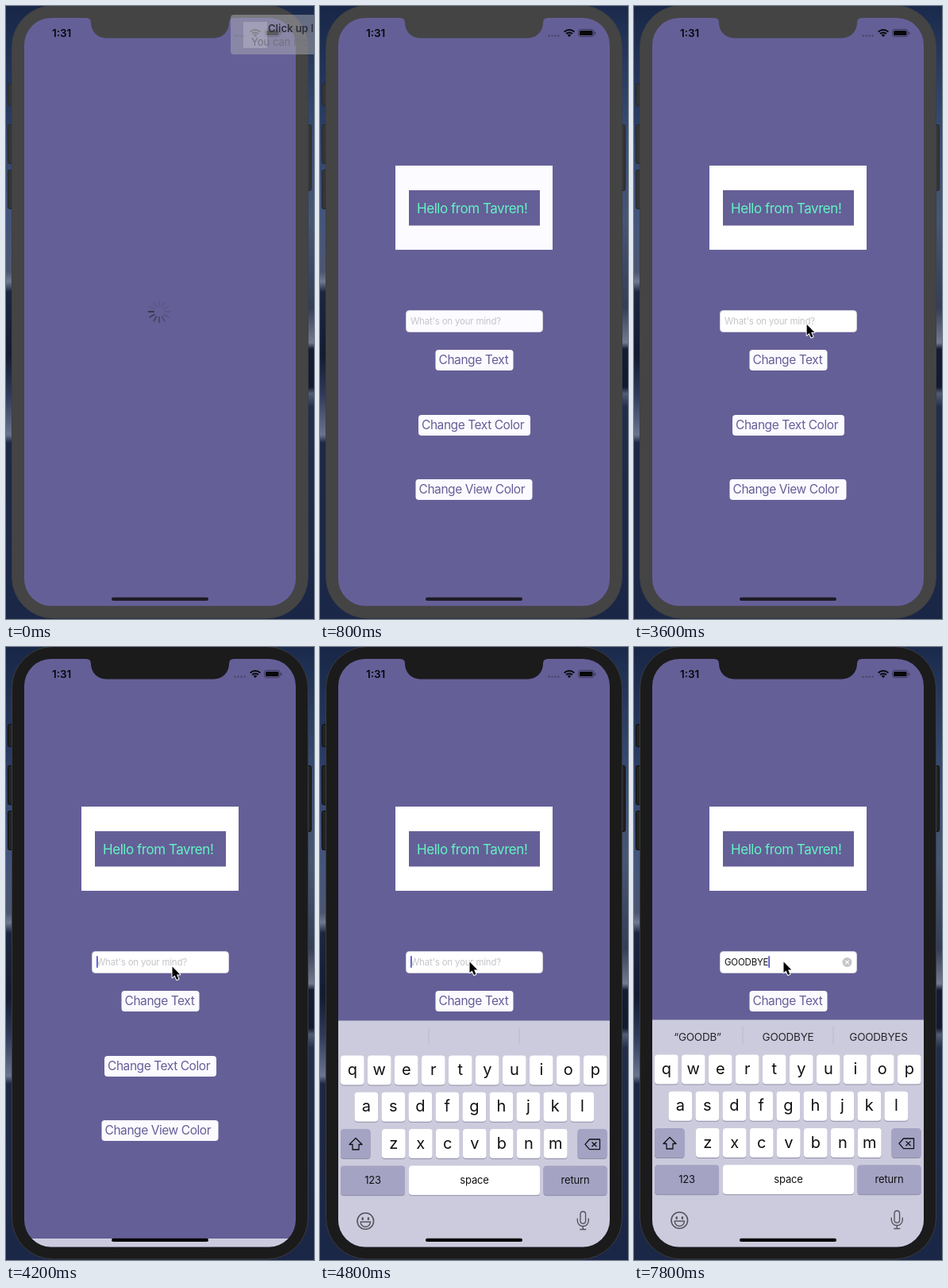
An HTML page with a canvas for the animation above (8000 ms loop, 388 by 772 pixels).

```html
<!DOCTYPE html>
<html lang="en">
<head>
<meta charset="utf-8">
<title>Phone text demo</title>
<style>
html, body { margin: 0; width: 388px; height: 772px; overflow: hidden; background: #1c2848; }
canvas { display: block; }
</style>
</head>
<body>
<canvas id="stage" width="388" height="772"></canvas>
<script>
const ctx = document.getElementById('stage').getContext('2d');
const LOOP = 8000, STEP = 200;
const PURPLE = '#655f98', KEY_DARK = '#a5a3c4', INK = '#111113';

// time, x, y of the pointer tip
const POINTER = [
  [1400, 396, 238], [2200, 296, 313], [2400, 296, 313], [3200, 220, 400],
  [3400, 220, 400], [4000, 209, 402], [4400, 209, 402], [4800, 188, 396]
];
// time, typed text, suggestions
const TYPING = [
  [6000, 'G', []],
  [6200, 'GO', ['“G”', 'Good', 'Great']],
  [6600, 'GOO', ['“GO”', 'Good', 'Great']],
  [6800, 'GOOD', ['“GOO”', 'GOOD', 'GOODS']],
  [7000, 'GOODB', ['“GOOD”', 'GOODBYE', 'GOODBYES']],
  [7200, 'GOODBY', ['“GOOD”', 'GOODBYE', 'GOODBYES']],
  [7600, 'GOODBYE', ['“GOODB”', 'GOODBYE', 'GOODBYES']]
];

function box(x, y, w, h, r, fill, line) {
  ctx.beginPath();
  ctx.roundRect(x, y, w, h, r);
  if (fill) { ctx.fillStyle = fill; ctx.fill(); }
  if (line) { ctx.strokeStyle = line; ctx.lineWidth = 1; ctx.stroke(); }
}

function text(str, x, y, size, color, { align = 'left', weight = 400, track = -0.018 } = {}) {
  ctx.font = `${weight} ${size}px Inter, "Open Sans", sans-serif`;
  ctx.letterSpacing = `${track * size}px`;
  ctx.textAlign = align;
  ctx.fillStyle = color;
  ctx.fillText(str, x, y);
}

function path(points, close) {
  ctx.beginPath();
  points.forEach(([x, y]) => ctx.lineTo(x, y));
  if (close) ctx.closePath();
}

function stroke(color, width) {
  ctx.strokeStyle = color;
  ctx.lineWidth = width;
  ctx.stroke();
}

function dot(x, y, r, color) {
  ctx.beginPath();
  ctx.arc(x, y, r, 0, 7);
  ctx.fillStyle = color;
  ctx.fill();
}

function strip(x, w, stops) {
  const g = ctx.createLinearGradient(0, 0, 0, 772);
  stops.forEach(([y, c]) => g.addColorStop(y / 772, c));
  ctx.fillStyle = g;
  ctx.fillRect(x, 0, w, 772);
}

function wallpaper() {
  strip(0, 194, [[0, '#182747'], [130, '#283a60'], [255, '#42547c'], [335, '#4c5672'], [347, '#707a91'],
    [360, '#1c2640'], [440, '#131b31'], [490, '#303b5b'], [540, '#69748f'], [550, '#1d2845'], [772, '#1b2747']]);
  strip(194, 194, [[0, '#1a2a4c'], [140, '#334970'], [270, '#465675'], [380, '#343e57'], [424, '#737b90'],
    [432, '#151d33'], [480, '#121a30'], [488, '#525d78'], [505, '#222d4c'], [772, '#1a2646']]);
}

function bezel(active) {
  const side = active ? '#232325' : '#333538', edge = active ? '#0d0d0e' : '#26282c';
  [[97, 29], [149, 50], [206, 50]].forEach(([y, h]) => box(2.5, y + .5, 8, h - 1, 2, side, edge));
  box(376.5, 149.5, 8, 83, 2, side, edge);
  box(7.5, -.5, 373, 771.5, 52, active ? '#1b1b1c' : '#444445', active ? '#3b3c40' : '#3e3f41');
}

function screenPath() {
  ctx.beginPath();
  ctx.moveTo(56, 15);
  ctx.lineTo(101, 15);
  ctx.quadraticCurveTo(107, 15, 107, 21);
  ctx.arcTo(107, 40.5, 127, 40.5, 19);
  ctx.arcTo(281, 40.5, 281, 21, 19);
  ctx.lineTo(281, 21);
  ctx.quadraticCurveTo(281, 15, 287, 15);
  ctx.arcTo(365, 15, 365, 60, 34);
  ctx.arcTo(365, 755.5, 320, 755.5, 34);
  ctx.arcTo(23, 755.5, 23, 720, 34);
  ctx.arcTo(23, 15, 56, 15, 34);
  ctx.closePath();
}

function statusBar() {
  text('1:31', 58, 39, 13.5, '#08080a', { weight: 600, track: 0 });
  for (let i = 0; i < 4; i++) dot(288.5 + i * 4, 37.5, 1.2, '#4a466c');
  const a = Math.PI * 1.5;
  [9, 5.6].forEach(r => {
    ctx.beginPath();
    ctx.arc(314, 39, r, a - .78, a + .78);
    stroke('#08080a', 2);
  });
  ctx.beginPath();
  ctx.moveTo(314, 39);
  ctx.arc(314, 39, 3.2, a - .78, a + .78);
  ctx.fillStyle = '#08080a';
  ctx.fill();
  box(325.5, 29.5, 19.5, 9, 2.8, null, '#3a3659');
  box(327, 31, 16.5, 6, 1.5, '#08080a');
  box(346, 32.5, 1.3, 3.5, 1, '#3a3659');
}

function spinner() {
  ctx.lineCap = 'round';
  for (let i = 0; i < 12; i++) {
    const a = Math.PI * (1 - i / 6), c = Math.cos(a), s = Math.sin(a);
    path([[193 + 7 * c, 385 + 7 * s], [193 + 13.5 * c, 385 + 13.5 * s]]);
    stroke(`rgba(55,53,68,${Math.max(.14, .9 - i * .12)})`, 2);
  }
  ctx.lineCap = 'butt';
}

function notice() {
  box(283, 11, 120, 50, 4, 'rgba(174,173,182,.5)');
  box(299, 20, 30, 33, 1, 'rgba(205,205,215,.35)');
  text('Click up left', 330, 33, 13, '#302f3c', { weight: 600, track: 0 });
  text('You can move', 309, 50, 13, '#74727f', { track: 0 });
}

function button(label, x, y, w) {
  box(x, y, w, 26, 4, '#fbfaff');
  text(label, x + 4, y + 18, 15.5, PURPLE, { track: -.028 });
}

function content(t, typed) {
  const white = t < 1200 ? '#fcfbff' : '#fff';
  box(95, 201, 198, 106, 0, white);
  box(112, 232, 165, 44.5, 0, PURPLE);
  text('Hello from Tavren!', 122, 261, 17, '#62f4c4', { track: -.027 });
  box(108.5, 383.5, 172, 27, 4, white, '#d3d2de');
  if (typed) {
    text(typed, 114, 401, 11.5, INK);
    dot(268.5, 397, 6, '#c5c5ca');
    path([[266.2, 394.7], [270.8, 399.3]]);
    stroke('#fff', 1.1);
    path([[270.8, 394.7], [266.2, 399.3]]);
    stroke('#fff', 1.1);
  } else {
    text("What's on your mind?", 114, 400.5, 11.5, '#c5c5ca');
  }
  if (t >= 4000 && !(t >= 5600 && t < 6000)) {
    ctx.font = '11.5px Inter, "Open Sans", sans-serif';
    ctx.letterSpacing = '-0.2px';
    const x = 114 + (typed ? ctx.measureText(typed).width : 0);
    box(x, 389, 1.7, 15, .8, '#5450d6');
  }
  button('Change Text', 145.5, 433, 98);
  button('Change Text Color', 124, 515, 141);
  button('Change View Color', 120.5, 596, 147);
}

function key(x, y, w, fill = '#fff') {
  box(x, y + 1, w, 37, 4, '#8d8ca6');
  box(x, y, w, 37, 4, fill);
}

function keyRow(letters, x, y) {
  [...letters].forEach((c, i) => {
    key(x + i * 34, y, 29.6);
    text(c, x + i * 34 + 14.8, y + 24.5, 20, INK, { align: 'center', track: 0 });
  });
}

function smiley(x, y) {
  ctx.beginPath();
  ctx.arc(x, y, 10.3, 0, 7);
  stroke('#55555f', 1.6);
  [-3.6, 3.6].forEach(d => {
    ctx.beginPath();
    ctx.ellipse(x + d, y - 3, 1.3, 1.9, 0, 0, 7);
    ctx.fillStyle = '#55555f';
    ctx.fill();
  });
  ctx.beginPath();
  ctx.arc(x, y + 1, 6.2, 0, Math.PI);
  ctx.closePath();
  stroke('#55555f', 1.4);
}

function mic(x, y) {
  box(x - 3.3, y - 11.5, 6.6, 15, 3.3);
  stroke('#55555f', 1.4);
  ctx.beginPath();
  ctx.moveTo(x - 7, y - 3);
  ctx.lineTo(x - 7, y);
  ctx.arc(x, y, 7, Math.PI, 0, true);
  ctx.lineTo(x + 7, y - 3);
  stroke('#55555f', 1.4);
  path([[x, y + 7], [x, y + 11]]);
  stroke('#55555f', 1.4);
  path([[x - 4, y + 11], [x + 4, y + 11]]);
  stroke('#55555f', 1.4);
}

function keyboard(shift, words) {
  ctx.save();
  ctx.translate(0, shift);
  box(23, 469.5, 342, 300, 0, '#cccbdd');
  [136.5, 250.5].forEach(x => box(x, 478, 1, 22, 0, '#b9b8cb'));
  words.forEach((w, i) => text(w, 80 + i * 114, 496, 13.5, '#26262c', { align: 'center' }));
  keyRow('qwertyuiop', 26, 513.5);
  keyRow('asdfghjkl', 43.5, 559.7);
  keyRow('zxcvbnm', 78, 606);
  key(26, 606, 37.5, KEY_DARK);
  key(324.5, 606, 37, KEY_DARK);
  key(26, 652.3, 81, KEY_DARK);
  key(112, 652.3, 165, '#fff');
  key(281.5, 652.3, 80, KEY_DARK);
  [['123', 66.5], ['space', 194.5], ['return', 321.5]].forEach(([s, x]) =>
    text(s, x, 675, 13, INK, { align: 'center', track: -.015 }));

  ctx.lineJoin = 'round';
  path([[45, 617.5], [53, 625.5], [49, 625.5], [49, 632], [41, 632], [41, 625.5], [37, 625.5]], true);
  stroke(INK, 1.3);
  path([[334, 625.3], [339.5, 619], [352.5, 619], [352.5, 631.6], [339.5, 631.6]], true);
  stroke(INK, 1.3);
  path([[342.5, 622.4], [348.5, 628.2]]);
  stroke(INK, 1.3);
  path([[348.5, 622.4], [342.5, 628.2]]);
  stroke(INK, 1.3);
  smiley(57.3, 722);
  mic(331.3, 721.5);
  ctx.restore();
}

function pointer(t) {
  if (t < 1600) return;
  let [, x, y] = POINTER[POINTER.length - 1];
  for (let i = 1; i < POINTER.length; i++) {
    const [t0, x0, y0] = POINTER[i - 1], [t1, x1, y1] = POINTER[i];
    if (t < t1) {
      const p = Math.max(0, (t - t0) / (t1 - t0)), e = p * p * (3 - 2 * p);
      x = x0 + (x1 - x0) * e;
      y = y0 + (y1 - y0) * e;
      break;
    }
  }
  ctx.save();
  ctx.translate(x, y);
  ctx.lineJoin = 'round';
  path([[.5, .5], [.5, 14.2], [3.6, 11.4], [6, 17], [8.4, 16], [6, 10.6], [10.3, 10.4]], true);
  stroke('#fff', 2);
  ctx.fillStyle = '#000';
  ctx.fill();
  ctx.restore();
}

function draw(t) {
  const [, typed, words] = TYPING.filter(k => k[0] <= t).pop() || [0, '', []];
  wallpaper();
  bezel(t >= 3800);
  ctx.save();
  screenPath();
  ctx.clip();
  ctx.fillStyle = PURPLE;
  ctx.fillRect(20, 10, 350, 750);
  statusBar();
  if (t < 200) spinner();
  else content(t, typed);
  if (t >= 4200) {
    const since = t < 4600 ? 0 : t - 4200;
    keyboard(since > 800 ? 0 : 275.5 * Math.exp(-since / 107), words);
  }
  box(133, 744.8, 122, 4.2, 2.1, t < 4200 ? '#1d1b26' : '#060607');
  ctx.restore();
  if (t < 200) notice();
  pointer(t);
}

function frame() {
  const t = performance.now() % LOOP;
  draw(Math.floor(t / STEP) * STEP);
  requestAnimationFrame(frame);
}
frame();
</script>
</body>
</html>
```
